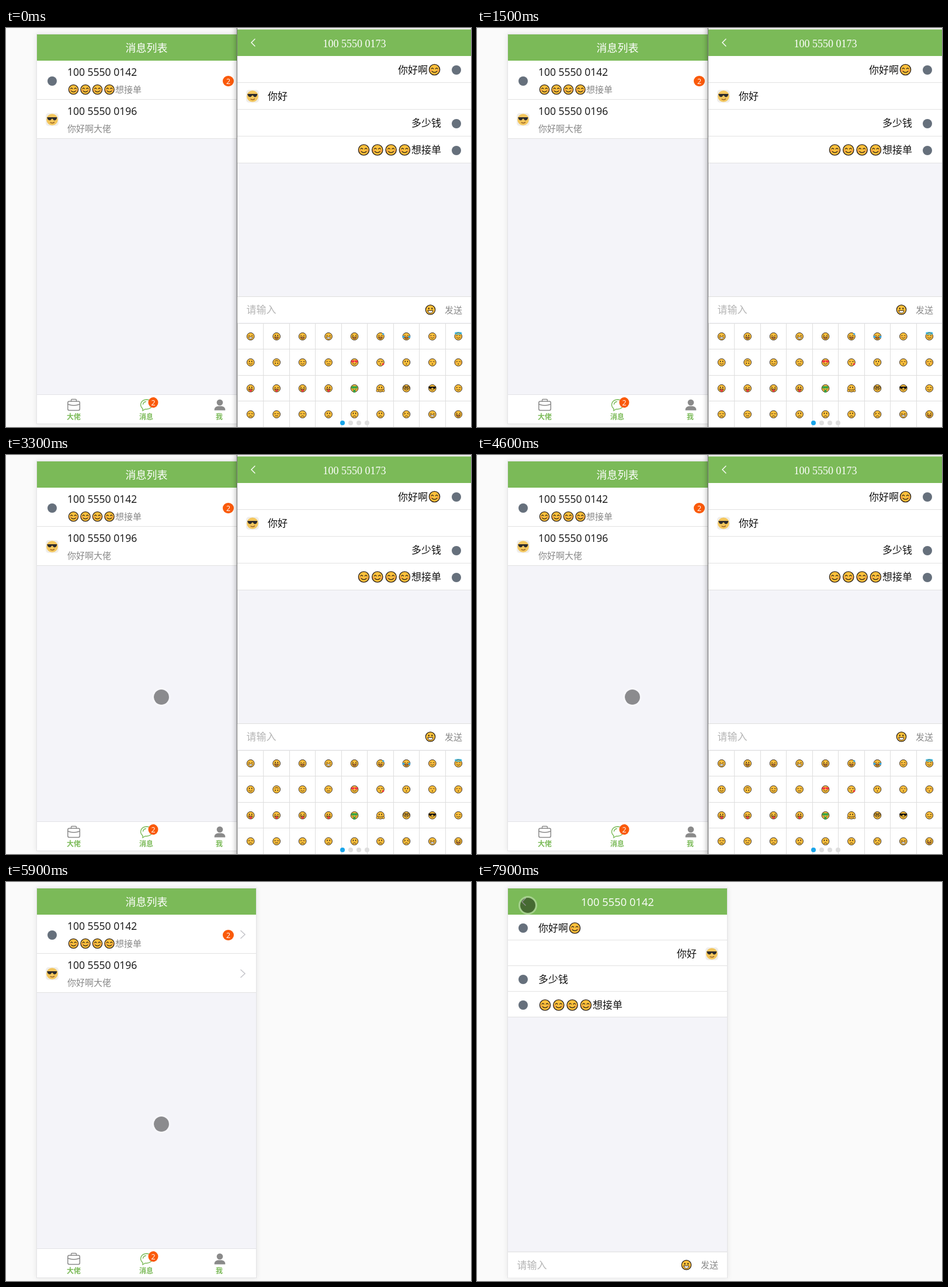
An HTML page for the animation above (8 s loop, 796x684 px).

```html
<!DOCTYPE html>
<html lang="zh-CN">
<head>
<meta charset="utf-8">
<title>消息列表</title>
<style>
html, body { margin: 0; width: 100%; height: 100%; overflow: hidden; background: #fafafa; }
svg { display: block; width: 796px; height: 684px; }
text { font-family: 'Open Sans', 'Noto Sans CJK SC', sans-serif; white-space: pre; }
.serif { font-family: 'Liberation Serif', serif; }
.phone { filter: drop-shadow(0 0 4px rgba(0,0,0,.09)); }
.front { filter: drop-shadow(0 0 5px rgba(0,0,0,.4)); }
</style>
</head>
<body>
<svg id="stage" viewBox="0 0 796 684"></svg>
<script>
const GREEN = '#7bba58', GREY = '#8a8a8a', LINE = '#dedede', PAGE = '#f4f4f9';
const LOOP = 8000, STEP = 100;
const PHONES = { first: '100 5550 0142', second: '100 5550 0196', own: '100 5550 0173' };

const rect = (x, y, w, h, fill, more = '') =>
  `<rect x="${x}" y="${y}" width="${w}" height="${h}" fill="${fill}" ${more}/>`;
const circle = (x, y, r, fill, more = '') =>
  `<circle cx="${x}" cy="${y}" r="${r}" fill="${fill}" ${more}/>`;
const path = (d, stroke, width = 1.5, fill = 'none') =>
  `<path d="${d}" fill="${fill}" stroke="${stroke}" stroke-width="${width}" stroke-linecap="round"/>`;
// y is the middle of the glyphs
const text = (x, y, size, str, fill = '#111', more = '') =>
  `<text x="${x}" y="${y + size * .37}" font-size="${size}" fill="${fill}" ${more}>${str}</text>`;
const middle = 'text-anchor="middle"';

const INK = '#2b2118', SKIN = '#ffc03b';
const both = draw => draw(-3.7) + draw(3.7);
const EYES = {
  'o': () => both(x => `<ellipse cx="${x * .85}" cy="-2.3" rx="1.1" ry="1.9" fill="${INK}"/>`),
  '^': () => both(x => path(`M${x - 1.9} -1.5q1.9 -3 3.8 0`, INK, 1.3)),
  '-': () => both(x => path(`M${x - 1.8} -1.5h3.6`, INK, 1.3)),
  'x': () => path('M-5.5 -4l3 2l-3 2M5.5 -4l-3 2l3 2', INK, 1.3),
  'w': () => circle(-3.7, -2, 1.4, INK) + path('M2 -2h3.6', INK, 1.3),
  'v': () => both(x => path(`M${x * 1.2} 1l-4 -4q1 -4 4 -1q3 -3 4 1z`, '#ee3344', 1, '#ee3344')),
  'B': () => path('M-9 -4h18l-1.5 4q-5 3 -6.5 -2h-2q-1.5 5 -6.5 2z', '#111', 1, '#111'),
};
const open = fill => path('M-5 1.8h10q-.8 4.700 -5 4.700t-5 -4.700z', INK, 1.1, fill);
const MOUTH = {
  'D': () => open('#c9783a'),
  'G': () => open('#fff'),
  's': () => path('M-4.7 2.500q4.700 4.500 9.400 0', INK, 1.3),
  'f': () => path('M-3.8 5.300q3.800 -3.600 7.600 0', INK, 1.3),
  '-': () => path('M-3.6 4h7.200', INK, 1.3),
  'k': () => circle(0, 4, 1.3, INK),
  't': () => open('#c9783a') + path('M-1.500 4.500v2.500q1.500 2.500 3.500 0v-2.500z', '#ee3344', 1.5, '#ee3344'),
};
const EXTRA = {
  '.': () => '',
  'c': () => both(x => circle(x * 1.7, 1.7, 1.7, '#f79a4a')),
  'd': () => circle(7, -6, 2.5, '#42aee8'),
  't': () => both(x => circle(x * 2, 1, 2.8, '#35a7e6')),
  'h': () => `<ellipse cy="-8" rx="8" ry="2.3" fill="none" stroke="#35b5e0" stroke-width="2.4"/>`,
  'l': () => circle(6.5, 4.5, 2.6, '#ee3344'),
  'H': () => both(x => circle(x * 2, 6, 3, SKIN, `stroke="${INK}"`)),
  'n': () => both(x => circle(x, -2, 3.6, 'none', `stroke="${INK}" stroke-width="1.3"`)),
  'u': () => '',
  'g': () => both(x => path(`M${x - 3} -5h6v5h-6z`, '#259a3c', 1, '#35a94a')) +
    path('M-2 4h4v6h-4z', '#259a3c', 1, '#35a94a'),
};
// code: eyes, mouth, extra
function face(x, y, r, code = '^sc') {
  const [e, m, k] = code, s = r / 10;
  return `<g transform="translate(${x} ${y}) scale(${s}) rotate(${k === 'u' ? 180 : 0})">` +
    circle(0, 0, 9.3, SKIN, `stroke="${INK}" stroke-width="1.4"`) +
    EYES[e]() + MOUTH[m]() + EXTRA[k]() + '</g>';
}
const faces = (x, y, r, gap) => [0, 1, 2, 3].map(i => face(x + i * gap, y, r)).join('');

const friend = (x, y) => circle(x, y, 8, '#66707c');
const cool = (x, y) => rect(x - 11, y - 11, 22, 22, '#f0eeea', 'rx="5"') +
  circle(x, y, 9.8, '#f3c65c') +
  `<g transform="translate(${x} ${y})">` +
  path('M-8 -3.500h16l-1.500 3.500q-4 2.500 -5.500 -2h-2q-1.500 4.500 -5.500 2z', '#2a2a2e', 1, '#2a2a2e') +
  path('M-3 5q4 2 6.500 -.5', '#8a5520', 1.2) + '</g>';

const badge = (x, y, w = 19) => rect(x - w / 2, y - 9, w, 18, '#fa5a0a', 'rx="9"') +
  text(x, y, 12.5, '2', '#fff', middle);
const arrow = (x, y) => path(`M${x - 3} ${y - 6}l7 6.500l-7 6.500`, '#c6c6cb', 1.6);
const back = (x, y) => path(`M${x + 3} ${y - 6}l-6 6l6 6`, '#fff', 1.4);

function inputBar(x, y, w) {
  const right = x + w;
  return rect(x, y - 22, w, 44, '#fff') + rect(x, y - 23, w, 1, LINE) +
    text(x + 15.5, y, 17, '请输入', '#b5b5b5') +
    face(right - 69.5, y, 8.8, 'oG.') + text(right - 45, y, 15, '发送', '#888');
}

const phoneFrame = rect(52.5, 10.5, 376, 668, PAGE, 'stroke="#e4e4e6" class="phone"') +
  rect(53, 11, 375, 45, GREEN);

const rows = (x, y, w, h, n) => Array.from({ length: n }, (_, i) =>
  rect(x, y + i * h, w, h, '#fff') +
  rect(x, y + (i + 1) * h - 1, w, i < n - 1 ? 2 : 1, '#e2e2e2')).join('');

const tabs = rect(53, 628, 375, 50, '#fff') + rect(53, 628, 375, 1, '#e2e2e6') +
  rect(105.8, 640, 20.5, 15.5, 'none', `rx="2.5" stroke="${GREY}" stroke-width="1.5"`) +
  path('M111.5 640v-2q0 -1.5 1.5 -1.5h6q1.5 0 1.5 1.5v2M106 645q10 4 20 0M114.5 647h3', GREY, 1.4) +
  path('M234 652.5c-6 -5 -4 -15 7 -15.5c13 0 13 15.5 0 16.5h-3l-4 2.5zM234.5 645q1 -4 5 -4.5', GREEN, 1.4) +
  badge(252, 642, 17) +
  circle(366, 642, 5.3, GREY) + path('M357 655v-2q1 -4 6 -4.5h6q5 .5 6 4.5v2z', GREY, .5, GREY) +
  [[116, '大佬'], [240, '消息'], [365, '我']].map(([x, s]) =>
    text(x, 666.5, 12, s, GREEN, middle + ' font-weight="700"')).join('');

const listPage = phoneFrame + text(240.5, 34, 18, '消息列表', '#fff', middle) +
  rows(53, 56, 375, 67, 2) +
  rect(53, 56, 375, 66, '#f8f8f8', 'id="pressed"') +
  friend(79, 91) + text(105, 76, 17.5, PHONES.first) +
  faces(115.5, 105.5, 8.8, 20.5) + text(187, 105, 15, '想接单', '#888') +
  badge(380.5, 91) + arrow(405, 89.5) +
  cool(79, 157) + text(105, 143, 17.5, PHONES.second) +
  text(105, 172, 15, '你好啊大佬', '#888') + arrow(405, 156.5) + tabs;

const chatPage = phoneFrame + back(80, 34) +
  text(240.5, 34, 18.4, PHONES.first, '#fff', middle) + rows(53, 56, 375, 44, 4) +
  friend(79, 79) + text(105, 79, 17, '你好啊') + face(167.5, 79, 9.8) +
  text(342, 123, 17, '你好') + cool(402, 123) +
  friend(79, 167) + text(105, 167, 17, '多少钱') +
  friend(79, 211) + faces(116.5, 211, 9.8, 23.3) + text(198, 211, 17, '想接单') +
  inputBar(53, 656.5, 375);

const KEYS = [
  '^G. oD. ^D. ^G. xD. ^Dd ^Dt ^sc ^sh',
  'os. osu ws. ^-. vs. wkl ok. ^k. ^kc',
  'ot. wt. xt. ot. osg osH osn Bs. ws.',
  '-f. --. -f. of. of. of. xf. -G. xD.',
].map(row => row.split(' '));
const COL = 44.45, ROW = 44.5;

const keyboard = rect(396, 506, 400, 178, '#fff') +
  KEYS.map((row, j) => rect(396, Math.round(505.5 + j * ROW), 400, 1, LINE) +
    row.map((code, i) => rect(Math.round(396 + i * COL), 506, 1, 178, j ? 'none' : LINE) +
      face(418.7 + i * COL, 528.7 + j * ROW, 6.8, code)).join('')).join('') +
  [0, 1, 2, 3].map(i => circle(576 + i * 14, 677, 4, i ? '#dedede' : '#19a5ea')).join('');

const frontWindow = rect(395, -8, 410, 700, '#777', 'class="front"') +
  rect(396, 0, 400, 684, PAGE) + rect(396, 0, 400, 2.5, '#efefef') + rect(396, 2.5, 400, 45.5, GREEN) +
  back(423, 25) + text(596.5, 26, 18, PHONES.own, '#fff', middle + ' class="serif"') +
  rows(396, 48, 400, 46, 4) +
  text(671, 72, 17, '你好啊') + face(733.5, 71.5, 9.8) + friend(771, 72) +
  cool(422, 117) + text(448, 117, 17, '你好') +
  text(694, 163, 17, '多少钱') + friend(771, 164) +
  faces(612.5, 209, 9.8, 23.3) + text(694, 209, 17, '想接单') + friend(771, 210) +
  inputBar(396, 483, 400) + keyboard;

const cursor = circle(0, 0, 13, '#000', 'fill-opacity=".43"') +
  circle(0, 0, 14.5, 'none', 'stroke="#fff" stroke-opacity=".32" stroke-width="3"');

const layer = (id, body) => `<g id="${id}">${body}</g>`;
document.getElementById('stage').innerHTML = rect(0, 0, 796, 684, '#fafafa') +
  layer('list', listPage) + layer('chat', chatPage) +
  layer('cursor', cursor) + layer('front', frontWindow);

const el = id => document.getElementById(id);
const show = (id, on) => el(id).setAttribute('display', on ? 'inline' : 'none');

// time, x, y
const ROUTE = [
  [1900, 397, 400], [2300, 325, 406], [2700, 266, 415], [6200, 266, 415],
  [6750, 329, 96], [7100, 329, 96], [7400, 200, 192], [7700, 75, 70],
  [7900, 87, 40], [LOOP, 87, 40],
];
function place(t) {
  const i = Math.max(1, ROUTE.findIndex(k => k[0] > t));
  const [t0, x0, y0] = ROUTE[i - 1], [t1, x1, y1] = ROUTE[i];
  const p = Math.max(0, (t - t0) / (t1 - t0)), e = p * p * (3 - 2 * p);
  return [x0 + (x1 - x0) * e, y0 + (y1 - y0) * e];
}

function draw(now) {
  const t = Math.floor(now % LOOP / STEP) * STEP;
  show('list', t < 7000);
  show('chat', t >= 7000);
  show('pressed', t >= 6800 && t < 7000);
  show('cursor', t >= 1900);
  el('cursor').setAttribute('transform', `translate(${place(t)})`);

  const gone = Math.min(1, Math.max(0, (t - 5600) / 300));
  const s = 1 - gone * .2;
  show('front', gone < 1);
  el('front').setAttribute('opacity', 1 - gone);
  el('front').setAttribute('transform', `translate(${596 * (1 - s)} ${684 * (1 - s)}) scale(${s})`);
  requestAnimationFrame(draw);
}
requestAnimationFrame(draw);
</script>
</body>
</html>
```
